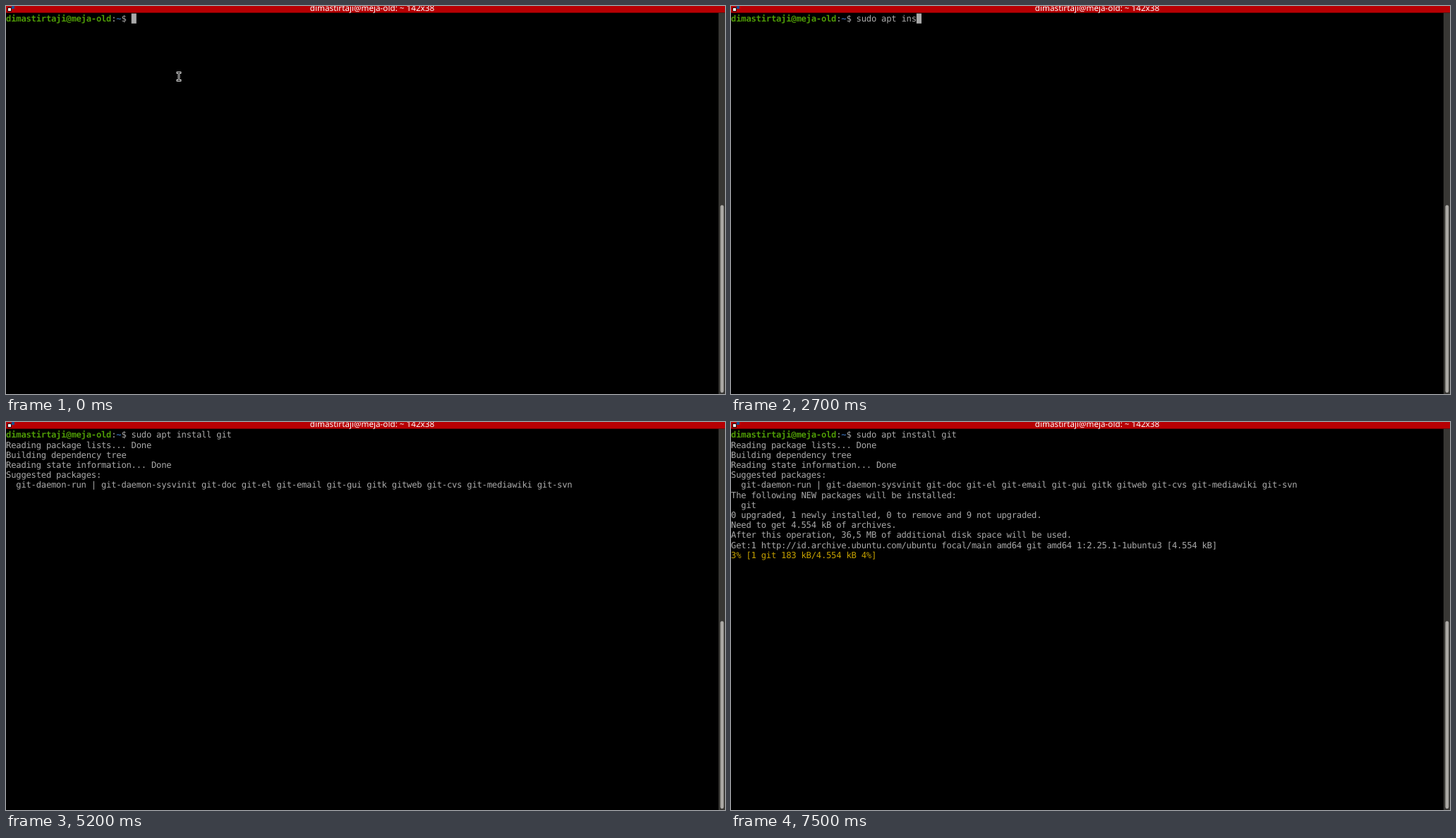
Write an HTML page with a canvas that moves like this. It is 1019x550 px and loops after 8000 ms.

```html
<!DOCTYPE html>
<html lang="en">
<head>
<meta charset="utf-8">
<title>Terminal</title>
<style>
  html, body { margin: 0; width: 100%; height: 100%; overflow: hidden; background: #000; }
  canvas { display: block; }
</style>
</head>
<body>
<canvas id="stage" width="1019" height="550"></canvas>
<script>
const ctx = document.getElementById('stage').getContext('2d');
const LOOP = 8000;
const CELL_W = 7.1, CELL_H = 14.2, LEFT = 0.2, TOP = 10.6, BASE = 11.8;
const MONO = '12.2px "DejaVu Sans Mono", "Noto Sans Mono", monospace';
const GREY = '#aaaaaa', GREEN = '#4e9a06', BLUE = '#3465a4', YELLOW = '#c4a000';
const HOST = 'dimastirtaji@meja-old';
const COMMAND = 'sudo apt install git';
const PROMPT_END = HOST.length + 4;

// [time, characters typed so far]
const KEYS = [
  [400, 1], [800, 2], [900, 3], [1200, 4], [1400, 5], [1500, 6], [1900, 7],
  [2100, 8], [2300, 9], [2400, 10], [2500, 11], [2700, 12], [2800, 13],
  [3000, 14], [3200, 15], [3400, 17], [3900, 18], [4000, 19], [4300, 20]
];

// [time, first row, lines written from there]
const OUTPUT = [
  [4500, 1, ['Reading package lists... Done']],
  [4800, 2, ['Building dependency tree... 50%']],
  [5100, 2, ['Building dependency tree', 'Reading state information... Done']],
  [5200, 4, [
    'Suggested packages:',
    '  git-daemon-run | git-daemon-sysvinit git-doc git-el git-email git-gui gitk gitweb git-cvs git-mediawiki git-svn'
  ]],
  [5500, 6, [
    'The following NEW packages will be installed:',
    '  git',
    '0 upgraded, 1 newly installed, 0 to remove and 9 not upgraded.',
    'Need to get 4.554 kB of archives.',
    'After this operation, 36,5 MB of additional disk space will be used.'
  ]],
  [5900, 11, ['Get:1 http://id.archive.ubuntu.com/ubuntu focal/main amd64 git amd64 1:2.25.1-1ubuntu3 [4.554 kB]']]
];

const fetching = (total, size, part) => `${total}% [1 git ${size}/4.554 kB ${part}%]`;

// [time, row, progress text]
const PROGRESS = [
  [5500, 11, '0% [Working]'],
  [5900, 12, fetching(0, '0 B', 0)],
  [6000, 12, fetching(0, '2.595 B', 0)],
  [6700, 12, fetching(1, '61,4 kB', 1)],
  [7000, 12, fetching(2, '113 kB', 2)],
  [7500, 12, fetching(3, '183 kB', 4)]
];

const latest = (list, t) => list.filter(item => item[0] <= t).pop();
const cellX = col => LEFT + col * CELL_W;
const cellY = row => TOP + row * CELL_H;

function rect(x, y, w, h, color) {
  ctx.fillStyle = color;
  ctx.fillRect(x, y, w, h);
}

// Centres each character in its grid cell
function print(text, col, row, color, bold) {
  ctx.font = (bold ? 'bold ' : '') + MONO;
  ctx.textAlign = 'center';
  ctx.fillStyle = color;
  [...text].forEach((ch, i) => {
    if (ch !== ' ') ctx.fillText(ch, cellX(col + i + 0.5), cellY(row) + BASE);
  });
}

function block(col, row, color, under) {
  rect(cellX(col), cellY(row), CELL_W, CELL_H, color);
  if (under) print(under, col, row, '#000');
}

function drawWindow() {
  rect(0, 0, 1019, 550, '#000');
  rect(0, 0, 1019, 9.6, '#b70003');

  rect(2, 2, 6, 6, '#2b1010');
  rect(3, 3, 4, 4, '#f0f0f0');
  rect(8, 0, 4, 4, '#1b4f8f');

  ctx.font = '11.7px "Noto Sans", "Open Sans", sans-serif';
  ctx.textAlign = 'center';
  ctx.fillStyle = '#fff';
  ctx.fillText(HOST + ': ~ 142x38', 519, 7);

  rect(1009.8, 9.6, 9.2, 540.4, '#383734');
  ctx.fillStyle = '#aaa8a4';
  ctx.beginPath();
  ctx.roundRect(1012.4, 282.2, 4.8, 266, 2.4);
  ctx.fill();
}

function drawPointer() {
  const beam = new Path2D('M243 94.5H247M243 105.5H247M245 94.5V105.5');
  ctx.lineCap = 'square';
  for (const [width, color] of [[2.8, '#e6e6e6'], [1, '#000']]) {
    ctx.lineWidth = width;
    ctx.strokeStyle = color;
    ctx.stroke(beam);
  }
}

function drawCursor(t, typed, progress) {
  if (t < 4500) {
    block(PROMPT_END + typed, 0, GREY);
  } else if (t < 5000) {
    block(0, 2, GREY, t >= 4800 ? 'B' : '');
  } else if (progress && Math.floor((t - 5000) / 600) % 2 === 1) {
    block(progress[2].length, progress[1], YELLOW);
  }
}

function draw(t) {
  drawWindow();

  const key = latest(KEYS, t);
  const typed = key ? key[1] : 0;
  print(HOST, 0, 0, GREEN, true);
  print(':', HOST.length, 0, GREY);
  print('~', HOST.length + 1, 0, BLUE, true);
  print('$ ' + COMMAND.slice(0, typed), HOST.length + 2, 0, GREY);

  const rows = [];
  for (const [time, first, lines] of OUTPUT) {
    if (t >= time) lines.forEach((line, i) => { rows[first + i] = line; });
  }
  rows.forEach((line, row) => print(line, 0, row, GREY));

  const progress = latest(PROGRESS, t);
  if (progress) print(progress[2], 0, progress[1], YELLOW);

  drawCursor(t, typed, progress);
  if (t < 500) drawPointer();
}

const start = performance.now();
ctx.textRendering = 'geometricPrecision';

function tick() {
  draw((performance.now() - start) % LOOP);
  requestAnimationFrame(tick);
}
tick();
</script>
</body>
</html>
```
